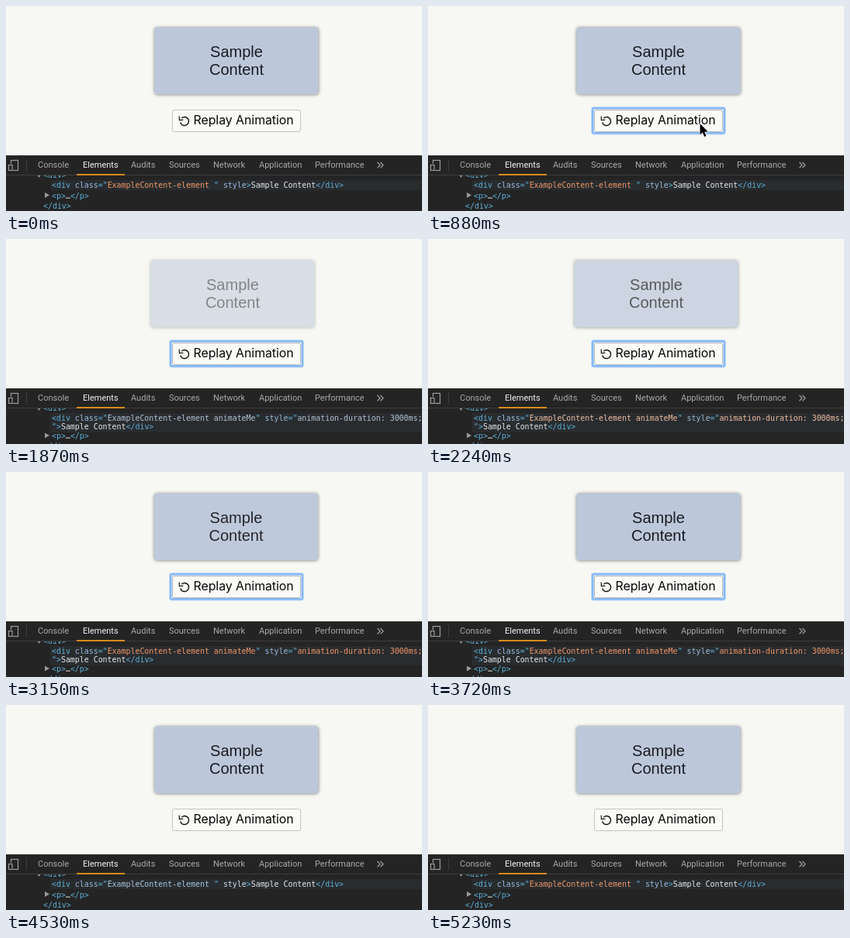
These frames come from a looping animation (536 by 265 pixels, 5.54 s). An HTML page with a canvas:

```html
<!DOCTYPE html>
<html lang="en">
<head>
<meta charset="utf-8">
<title>Replay animation</title>
<style>
  html, body { margin: 0; width: 100%; height: 100%; overflow: hidden; background: #f7f8f3; }
  canvas { display: block; }
</style>
</head>
<body>
<canvas id="stage" width="536" height="265"></canvas>
<script>
const W = 536, H = 265, LOOP = 5540;
const CLICK = 880, START = 960, END = 3890, SLIDE = 3000;
const CODE = '9.92px "DejaVu Sans Mono", monospace', CHAR = 5.97;
const TAG = '#5db0d7', ATTR = '#9bbbdc', VALUE = '#f29766', TEXT = '#e6e6e6';
const PURPLE = '120,44,118';

const ctx = document.getElementById('stage').getContext('2d');
const layer = document.createElement('canvas');
layer.width = W;
layer.height = 193;
const lctx = layer.getContext('2d');

const clamp = v => Math.max(0, Math.min(1, v));
const bez = (u, a, b) => 3 * u * (1 - u) * (1 - u) * a + 3 * u * u * (1 - u) * b + u * u * u;

// CSS "ease" curve
function ease(x) {
  let lo = 0, hi = 1;
  for (let i = 0; i < 24; i++) {
    const mid = (lo + hi) / 2;
    if (bez(mid, 0.25, 0.25) < x) lo = mid; else hi = mid;
  }
  return bez(lo, 0.1, 1);
}

function mix(stops, u) {
  let i = 0;
  while (i < stops.length - 2 && u > stops[i + 1][0]) i++;
  const [a, from] = stops[i], [b, to] = stops[i + 1];
  const k = clamp((u - a) / (b - a));
  return `rgb(${from.map((v, n) => Math.round(v + (to[n] - v) * k))})`;
}

function rounded(c, x, y, w, h, r) {
  c.beginPath();
  c.roundRect(x, y, w, h, r);
}

function label(c, str, x, y, font, color, align = 'left') {
  c.font = font;
  c.fillStyle = color;
  c.textAlign = align;
  c.fillText(str, x, y);
}

function triangle(x, y, open) {
  ctx.fillStyle = '#9a9a9a';
  ctx.beginPath();
  if (open) {
    ctx.moveTo(x, y); ctx.lineTo(x + 7, y); ctx.lineTo(x + 3.5, y + 6);
  } else {
    ctx.moveTo(x, y); ctx.lineTo(x + 6, y + 3.5); ctx.lineTo(x, y + 7);
  }
  ctx.fill();
}

function card(t) {
  const running = t >= START && t < END;
  const p = running ? ease(clamp((t - START) / SLIDE)) : 1;
  const c = lctx;
  c.clearRect(0, 0, W, 193);
  c.save();
  c.translate(-10.6 * (1 - p), 0);
  c.shadowColor = 'rgba(0,0,0,.5)';
  c.shadowBlur = 4;
  c.shadowOffsetY = 0.5;
  c.fillStyle = '#bcc8da';
  rounded(c, 191.5, 27.5, 211, 86.5, 4);
  c.fill();
  c.shadowColor = 'transparent';
  const font = '20px "Liberation Sans", Arial, sans-serif';
  label(c, 'Sample', 297, 66, font, '#1b1b22', 'center');
  label(c, 'Content', 297, 89, font, '#1b1b22', 'center');
  c.restore();
  ctx.globalAlpha = p;
  ctx.drawImage(layer, 0, 0);
  ctx.globalAlpha = 1;
}

function button(focused) {
  if (focused) {
    ctx.fillStyle = 'rgba(125,180,245,.45)';
    rounded(ctx, 210, 130, 174, 36.5, 4);
    ctx.fill();
    ctx.fillStyle = '#84b8f6';
    rounded(ctx, 211, 131, 172, 34.5, 3);
    ctx.fill();
    ctx.fillStyle = '#fafaf7';
    ctx.fillRect(213.5, 133.5, 167, 29.5);
  }
  ctx.fillStyle = '#fafaf7';
  ctx.strokeStyle = focused ? '#b4b8bb' : '#c3c3bf';
  ctx.lineWidth = 1;
  rounded(ctx, 214.5, 134.5, 165, 28, 2.5);
  ctx.fill();
  ctx.stroke();

  ctx.strokeStyle = ctx.fillStyle = '#111';
  ctx.lineWidth = 1.4;
  ctx.beginPath();
  ctx.arc(230, 149, 5.5, -2.3, 2.9);
  ctx.stroke();
  ctx.beginPath();
  ctx.moveTo(223.2, 142.6);
  ctx.lineTo(223.4, 147.6);
  ctx.lineTo(228.4, 147.2);
  ctx.lineWidth = 1.2;
  ctx.stroke();
  label(ctx, 'Replay Animation', 241.5, 153.2, '15.8px Inter, sans-serif', '#050505');
}

// Draws [text, colour, highlight alpha] runs on the character grid
function code(x, y, runs) {
  for (const [str, color, glow] of runs) {
    const w = str.length * CHAR;
    if (glow) {
      ctx.fillStyle = `rgba(${PURPLE},${glow})`;
      ctx.fillRect(x, y - 10, w, 12.5);
    }
    label(ctx, str, x, y, CODE, color);
    x += w;
  }
}

function markup(t) {
  const running = t >= START && t < END;
  const since = running ? t - START : t - END;
  const flashing = t >= START;
  const u = flashing ? since / (running ? 1640 : 1340) : 1;
  const glow = flashing ? 1 - clamp((since - 240) / (running ? 500 : 260)) : 0;
  const value = mix([[0, [255, 255, 255]], [0.5, [165, 198, 224]],
    [0.78, [240, 190, 162]], [1, [242, 151, 102]]], u);
  const attr = mix([[0, [255, 255, 255]], [1, [155, 187, 220]]], u);

  ctx.save();
  ctx.beginPath();
  ctx.rect(0, 219, W, H - 219);
  ctx.clip();
  ctx.fillStyle = '#292c2f';
  ctx.fillRect(57, 225, W - 57, running ? 25 : 13);
  triangle(39, 216, true);
  code(48, 222, [['<div>', TAG]]);

  const open = [['<div ', TAG], ['class', ATTR], ['="', TAG]];
  const text = [['Sample Content', TEXT], ['</div>', TAG]];
  let y;
  if (running) {
    code(59, 235, [...open, ['ExampleContent-element animateMe', value, glow], ['" ', TAG],
      ['style', ATTR], ['="', TAG], ['animation-duration: 3000ms;', value, glow]]);
    code(59, 246, [['">', TAG], ...text]);
    y = 258;
  } else {
    code(59, 235, [...open, ['ExampleContent-element ', value, glow], ['" ', TAG],
      ['style', attr, glow], ['>', TAG], ...text]);
    y = 248.5;
  }
  triangle(50, y - 7.5, false);
  code(59, y, [['<p>', TAG], ['…', TEXT], ['</p>', TAG]]);
  code(48, y + 13, [['</div>', TAG]]);
  ctx.restore();
}

function panel(t) {
  ctx.fillStyle = '#242424';
  ctx.fillRect(0, 193, W, H - 193);
  ctx.fillStyle = '#333';
  ctx.fillRect(0, 193, W, 1);
  ctx.fillStyle = '#3d3d3d';
  ctx.fillRect(0, 218, W, 1);
  ctx.fillRect(26, 198, 1, 15);
  ctx.fillStyle = '#d78b1c';
  ctx.fillRect(91, 217, 62, 2);

  ctx.strokeStyle = '#9c9c9c';
  ctx.lineWidth = 1.2;
  ctx.strokeRect(6.5, 199.5, 9, 13);
  ctx.fillStyle = '#242424';
  ctx.fillRect(2, 204, 7, 10);
  ctx.strokeRect(3.5, 205.5, 4.5, 7);

  const tabs = { Console: 41, Elements: 99, Audits: 161, Sources: 210,
    Network: 267, Application: 326, Performance: 398 };
  const font = '11px Roboto, sans-serif';
  for (const name in tabs) {
    label(ctx, name, tabs[name], 209, font, name === 'Elements' ? '#f2f2f2' : '#a9a9a9');
  }
  ctx.strokeStyle = '#a5a5a5';
  for (const x of [478.5, 482.5]) {
    ctx.beginPath();
    ctx.moveTo(x, 202);
    ctx.lineTo(x + 3.5, 205.7);
    ctx.lineTo(x, 209.4);
    ctx.stroke();
  }
  markup(t);
}

function cursor(t) {
  if (t < 360 || t >= 1560) return;
  const k = t < 1000 ? clamp((t - 340) / 390) : 1 - clamp((t - 1280) / 280);
  const u = 1 - (1 - k) * (1 - k);
  const path = (a, b, c) => (1 - u) * (1 - u) * a + 2 * u * (1 - u) * b + u * u * c;
  ctx.save();
  ctx.translate(path(481, 390, 350.5), path(173, 122, 152));
  ctx.beginPath();
  for (const [x, y] of [[0, 0], [0, 14.5], [3.3, 11.6], [5.6, 17], [8, 16], [5.7, 10.7], [10.2, 10.4]]) {
    ctx.lineTo(x, y);
  }
  ctx.closePath();
  ctx.fillStyle = '#000';
  ctx.strokeStyle = '#fff';
  ctx.lineWidth = 1.6;
  ctx.lineJoin = 'round';
  ctx.stroke();
  ctx.fill();
  ctx.restore();
}

function draw(t) {
  ctx.fillStyle = '#f7f8f3';
  ctx.fillRect(0, 0, W, H);
  card(t);
  button(t >= CLICK && t < END);
  panel(t);
  cursor(t);
}

const begin = performance.now();
function tick() {
  draw((performance.now() - begin) % LOOP);
  requestAnimationFrame(tick);
}
tick();
</script>
</body>
</html>
```
